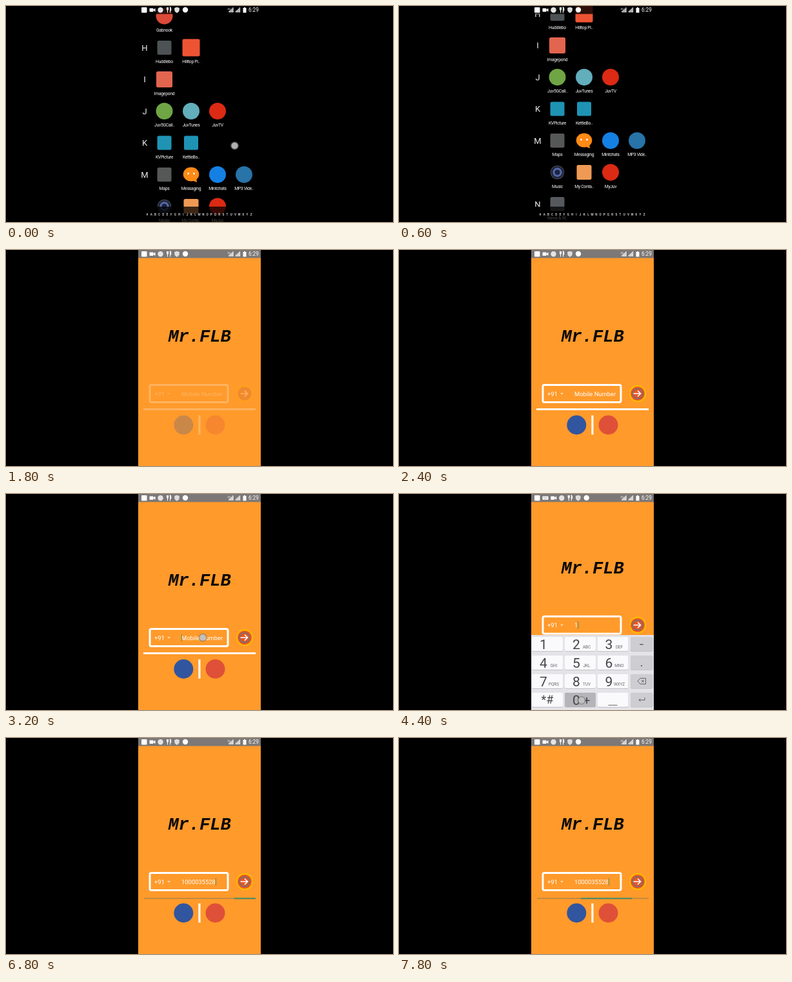
Recreate the animation shown at these times as an HTML page. Size 600 by 337 pixels, loop 8000 ms.

```html
<!DOCTYPE html>
<html lang="en">
<head>
<meta charset="utf-8">
<title>Phone sign-in</title>
<style>
html, body { margin: 0; width: 100%; height: 100%; overflow: hidden; background: #000; }
svg { display: block; width: 100%; height: 100%; font-family: Roboto, sans-serif; }
.label { font-size: 6.8px; letter-spacing: -.3px; fill: #fff; text-anchor: middle; }
.section { font-size: 13px; fill: #eee; text-anchor: middle; }
.index { font-size: 4.6px; font-weight: 500; fill: #eee; text-anchor: middle; }
.title { font: italic bold 27px "Liberation Mono", monospace; fill: #0c0a08; text-anchor: middle; }
.field { font-size: 9.4px; fill: #fff; }
.digit { font-size: 21px; fill: #454549; text-anchor: middle; }
.abc { font-size: 6.3px; fill: #66666a; text-anchor: middle; }
</style>
</head>
<body>
<svg id="stage" viewBox="0 0 600 337" preserveAspectRatio="none"></svg>
<script>
const LOOP = 8000, STEP = 200, NUMBER = "1000035528";
const ROW = 49.5, COLS = [245.5, 287, 328, 369];

const rect = (x, y, w, h, fill, r = 0, extra = "") =>
  `<rect x="${x}" y="${y}" width="${w}" height="${h}" rx="${r}" fill="${fill}" ${extra}/>`;
const circle = (x, y, r, fill, extra = "") =>
  `<circle cx="${x}" cy="${y}" r="${r}" fill="${fill}" ${extra}/>`;
const text = (x, y, s, cls, extra = "") =>
  `<text x="${x}" y="${y}" class="${cls}" ${extra}>${s}</text>`;
const path = (d, extra) => `<path d="${d}" ${extra}/>`;

// App list
const disc = color => (x, y) => circle(x, y, 13, color);
const tile = (color, half = 11) => (x, y) => rect(x - half, y - half, 2 * half, 2 * half, color, 2.5);
const bubble = (x, y) =>
  `<ellipse cx="${x}" cy="${y - .5}" rx="12.3" ry="11" fill="#ff8a16"/>` +
  path(`M${x + 1} ${y + 9}l8 3-1-6z`, 'fill="#ff8a16"') +
  [-4.5, 4.5].map(d => circle(x + d, y - 1.5, 1.4, "#fff")).join("");
const speaker = (x, y) =>
  circle(x, y, 10.8, "#3b3f4b") + circle(x, y, 9.3, "#1b2137") +
  circle(x, y, 7.2, "#5468a4") + circle(x, y, 4, "#1a2344");

const rows = [
  ["", ["Gabnook", disc("#dc4a38")]],
  ["H", ["Huddlebo", tile("#4d5354")], ["Hilltop Pi..", tile("#ee5433", 13.5)]],
  ["I", ["Imagepond", tile("#e2654f", 12.5)]],
  ["J", ["Juv5GCall..", disc("#6fa544")], ["JuvTunes", disc("#62aebb")], ["JuvTV", disc("#dc2a14")]],
  ["K", ["KVPicture", tile("#1f93b4")], ["KettleBo..", tile("#1f93b4")]],
  ["M", ["Maps", tile("#565858")], ["Messaging", bubble], ["Mintchats", disc("#1580e4")], ["MP3 Vide..", disc("#2873a8")]],
  ["", ["Music", speaker], ["My Conta..", tile("#ee9a55", 11.5)], ["MyJuv", disc("#dc2a14")]],
  ["N", ["News &amp; W..", tile("#56595e")]]
];

const appList = rows.map(([letter, ...apps], i) => {
  const y = 15.5 + i * ROW;
  return text(215, y + 4.5, letter, "section") + apps.map(([name, icon], c) =>
    icon(COLS[c], y) + text(COLS[c], y + 24, name, "label")).join("");
}).join("");

const indexStrip = [..."#ABCDEFGHIJKLMNOPQRSTUVWXYZ"]
  .map((ch, i) => text(219 + i * 6.2, 326.5, ch, "index")).join("");

// Status bar
const fork = path("M249.5 2v3q0 1.5 1 1.5v4M251.5 2v3q0 1.5-1 1.5M250.5 2v4M254.5 10.5V2q1.8 1 1.2 5h-1.2",
  'fill="none" stroke="#fff" stroke-width="1.1"');
const shield = path("M265 1.7l3.8 1.4v3q0 3-3.8 4.8q-3.8-1.8-3.8-4.8v-3z", 'fill="#ddd"');
const camera = rect(222.5, 3.5, 6, 5.5, "#fff", .8) + path("M228.5 5.5l3-2v5.5l-3-2z", 'fill="#fff"');
const keyboardIcon = rect(222.5, 3.5, 9, 5.5, "#fff", .8) +
  path("M224 5.3h6M225 7.3h4", 'stroke="#777" stroke-width=".8" stroke-dasharray="1 .6"');
const bars = x => [0, 1, 2, 3].map(i => rect(x + i * 1.9, 7.5 - i * 1.7, 1.3, 2.5 + i * 1.7, "#fff")).join("");
const statusRight = text(343.5, 5.5, "4G", "", 'fill="#fff" font-size="3.6"') + bars(345.5) + bars(356) +
  rect(367.5, 3, 5, 7.5, "#fff", .6) + rect(369, 2, 2, 1, "#fff") +
  text(376, 9.3, "6:29", "", 'fill="#fff" font-size="8.2"');

// Number keyboard
const keyX = [206, 257, 307.5, 359], keyY = i => 223 + 29 * i;
const key = (col, row, fill) => {
  const w = col < 3 ? 48 : 34.5;
  return rect(keyX[col], keyY(row) + .8, w, 22, "#b9b9bf", 2) + rect(keyX[col], keyY(row), w, 22, fill, 2);
};
const letters = ["", "ABC", "DEF", "GHI", "JKL", "MNO", "PQRS", "TUV", "WXYZ"];
const faces = letters.map((abc, i) => {
  const x = keyX[i % 3] + 18, y = keyY(Math.floor(i / 3));
  return text(x, y + 18.7, i + 1, "digit") + text(x + 16, y + 18, abc, "abc");
}).join("") +
  text(230, 327, "*#", "digit", 'style="font-size:18px"') + text(275, 328.7, "0", "digit") +
  text(291, 327.5, "+", "digit", 'style="font-size:18px"') + rect(324.5, 329, 14, 1, "#66666a") +
  rect(373.3, 234, 5.4, 1.4, "#55555a") + circle(376, 268, 1.1, "#55555a") +
  path("M370 292l4-4.5h8.5v9h-8.5zM376 290l4 4m0-4l-4 4M381 317.5v4h-9m2.5-2.5l-2.5 2.5l2.5 2.5",
    'fill="none" stroke="#66666a" stroke-width="1"');
const allKeys = keyX.map((_, r) => keyX.map((_, c) => key(c, r, c < 3 ? "#fafafc" : "#cdcdd2")).join("")).join("");
const keySpot = d => d === "0" ? [1, 3] : [(d - 1) % 3, Math.floor((d - 1) / 3)];

// Sign-in form
const goButton = circle(370, 224, 13.2, "#ffb804") + circle(370, 224, 10.8, "#ea5522") +
  circle(370, 224, 7.6, "none", 'stroke="#8b6a66" stroke-width="2.2"') +
  path("M363.5 224h11m-4.5-4.5l4.5 4.5l-4.5 4.5", 'fill="none" stroke="#fff" stroke-width="1.7"');
const formBase = rect(223, 210.5, 121, 27, "none", 2.5, 'stroke="#fff" stroke-width="3"') +
  text(230, 227.7, "+91", "field") + path("M250 223h5l-2.5 2.5z", 'fill="#ffe3c2"') + goButton +
  rect(298.3, 258, 3.2, 30, "#fff") + circle(275.3, 273, 15, "#31559f") + circle(324.5, 273, 15, "#df5038");

const stage = document.getElementById("stage");
stage.innerHTML = `
<defs>
  <clipPath id="screen">${rect(205, 0, 190, 337, "#000")}</clipPath>
  <clipPath id="track">${rect(214, 240, 173, 20, "#000")}</clipPath>
</defs>
${rect(0, 0, 600, 337, "#000")}
<g clip-path="url(#screen)">
  <g id="launcher">
    <g id="apps">${appList}</g>
    ${rect(205, 0, 190, 12.5, "#000", 0, 'opacity=".8"')}
    ${rect(205, 313, 190, 24, "#000", 0, 'opacity=".75"')}${indexStrip}
  </g>
  <g id="app">
    ${rect(205, 0, 190, 337, "#ff9a2b")}
    <g id="page">
      ${text(300, 143, "Mr.FLB", "title", 'id="title"')}
      <g id="form">
        ${formBase}
        ${text(272, 227.7, "", "field", 'id="entry"')}
        ${rect(272, 218.5, 1, 11.5, "#648b57", 0, 'id="cursor"')}
        ${rect(213, 247, 174, 3, "#fff", 0, 'id="divider"')}
        <g id="progress" clip-path="url(#track)">
          ${rect(214, 249.5, 173, 1.6, "#b48a45")}${rect(0, 249.5, 79, 1.8, "#368b70", 0, 'id="runner"')}
        </g>
      </g>
    </g>
    <g id="keyboard">
      ${rect(205, 220, 190, 117, "#e3e3e8")}${allKeys}<g id="pressed"></g>${faces}
    </g>
    ${rect(205, 0, 190, 12.5, "#7d7878")}
  </g>
  ${rect(210, 2, 8.5, 8.5, "#fff", 1)}
  <g id="imeIcon">${keyboardIcon}</g>
  <g id="notices">${camera}${circle(239.5, 6.2, 4.2, "#e4e4e4")}${fork}${shield}${circle(278, 6, 4.2, "#fff")}</g>
  ${statusRight}
  <g id="touch">${circle(0, 0, 6.5, "#777", 'opacity=".6"')}${circle(0, 0, 5, "#ccc", 'opacity=".8"')}</g>
</g>`;

const el = id => document.getElementById(id);
const show = (id, on) => el(id).setAttribute("display", on ? "inline" : "none");
const move = (id, x, y) => el(id).setAttribute("transform", `translate(${x} ${y})`);
const ramp = (t, a, b) => Math.min(1, Math.max(0, (t - a) / (b - a)));
const within = (t, a, b) => t >= a && t < b;

function touchAt(t, scroll, next) {
  if (t < 400) return [354.5, 218 - scroll];
  if (within(t, 800, 1000)) return [287, 160];
  if (within(t, 3000, 3400)) return [305, 224];
  if (within(t, 6200, 6400)) return [370, 204];
  if (next) return [keyX[next[0]] + 26, keyY(next[1]) + 12];
  return null;
}

function render(t) {
  const scroll = 53 * (1 - (1 - ramp(t, 0, 600)) ** 2);
  show("launcher", t < 1000);
  show("app", t >= 1000);
  move("apps", 0, -scroll);

  show("title", t >= 1400);
  el("form").setAttribute("opacity", ramp(t, 1600, 2400));

  const open = ramp(t, 3200, 3800) * (1 - ramp(t, 6200, 6400));
  move("page", 0, -19.5 * open);
  move("keyboard", 0, 117 * (1 - open));
  const ime = within(t, 3600, 5600);
  show("imeIcon", ime);
  move("notices", ime ? 12.7 : 0, 0);

  const count = t < 4400 ? 0 : Math.min(10, 1 + Math.round((t - 4400) * 9 / 1400));
  const next = t >= 4200 && count < 10 ? keySpot(NUMBER[count]) : null;
  el("entry").textContent = count ? NUMBER.slice(0, count) : "Mobile Number";
  el("cursor").setAttribute("x", 272 + count * 5.28);
  show("cursor", t >= 3200);
  el("pressed").innerHTML = next ? key(...next, "#b4b4b9") : "";

  const busy = t >= 6400;
  show("divider", !busy);
  show("progress", busy);
  el("runner").setAttribute("x", 135 + 252 * ((t + 16) / 1400 % 1));

  const touch = touchAt(t, scroll, next);
  show("touch", touch);
  if (touch) move("touch", ...touch);
}

const begin = performance.now();
function tick() {
  const t = (performance.now() - begin) % LOOP;
  render(Math.floor(t / STEP) * STEP);
  requestAnimationFrame(tick);
}
tick();
</script>
</body>
</html>
```
